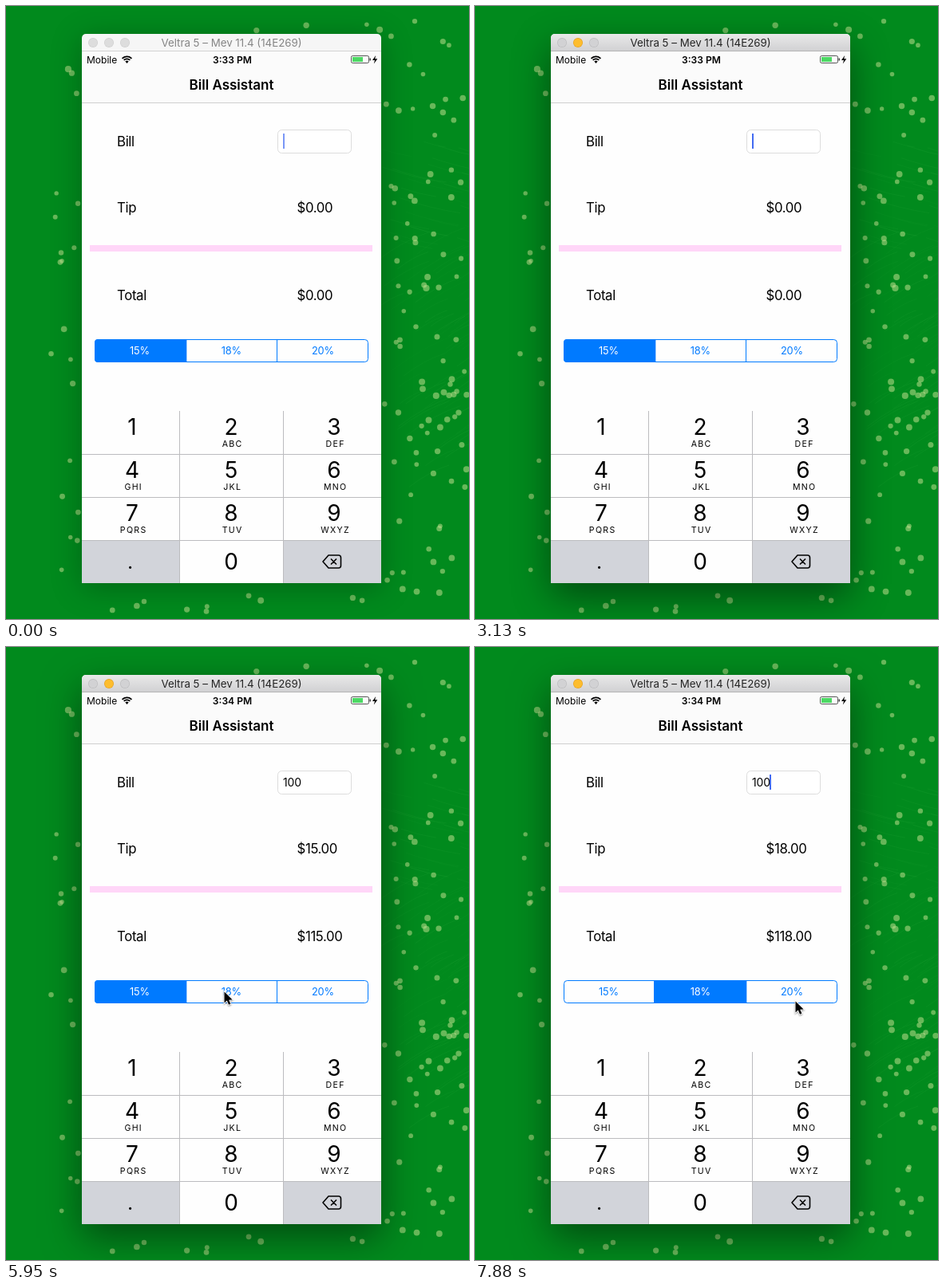
An HTML page with a canvas for the animation above (8000 ms loop, 580 by 769 pixels).

```html
<!DOCTYPE html>
<html lang="en">
<head>
<meta charset="utf-8">
<title>Bill Assistant</title>
<style>
html, body { margin: 0; width: 580px; height: 769px; overflow: hidden; background: #018a1d; }
canvas { display: block; }
</style>
</head>
<body>
<canvas id="stage" width="580" height="769"></canvas>
<script>
const ctx = document.getElementById('stage').getContext('2d');
const LOOP = 8000, TICK = 148.8;
const ACTIVATE = 3100, TYPE_START = 3850, TYPE_END = 4620, SELECT = 6390;
const BLINK = 980;
const BLUE = '#007aff';
const rates = [.15, .18, .2];

const clamp = v => Math.min(1, Math.max(0, v));
const ease = v => v * v * (3 - 2 * v);
const mix = (a, b, v) => a + (b - a) * v;

function seeded(seed) {
  return () => (seed = (seed * 16807) % 2147483647) / 2147483647;
}

function rect(x, y, w, h, color) {
  ctx.fillStyle = color;
  ctx.fillRect(x, y, w, h);
}

function fillPath(points, color) {
  ctx.beginPath();
  points.forEach(([x, y]) => ctx.lineTo(x, y));
  ctx.closePath();
  ctx.fillStyle = color;
  ctx.fill();
}

function rounded(x, y, w, h, r) {
  ctx.beginPath();
  ctx.roundRect(x, y, w, h, r);
}

function circle(x, y, r, color) {
  ctx.beginPath();
  ctx.arc(x, y, r, 0, Math.PI * 2);
  ctx.fillStyle = color;
  ctx.fill();
}

function label(text, x, y, size, { align = 'left', color = '#000', weight = 400, spacing = 0 } = {}) {
  ctx.font = `${weight} ${size}px Inter, sans-serif`;
  ctx.letterSpacing = spacing + 'px';
  ctx.textAlign = align;
  ctx.fillStyle = color;
  ctx.fillText(text, x, y);
}

function wallpaper() {
  rect(0, 0, 580, 769, '#018a1d');
  const rand = seeded(71);
  ctx.lineWidth = .7;
  for (let i = 0; i < 90; i++) {
    const x = 465 + rand() * 110, y = 170 + rand() * 440, len = 25 + rand() * 60;
    const slope = y < 300 ? .25 : -.55;
    ctx.strokeStyle = `rgba(120,220,120,${.03 + rand() * .07})`;
    ctx.beginPath();
    ctx.moveTo(x, y);
    ctx.quadraticCurveTo(x + len / 2, y + len * slope * .7, x + len, y + len * slope);
    ctx.stroke();
  }
  const scatter = (count, x, y, w, h) => {
    for (let i = 0; i < count; i++) {
      circle(x + rand() * w, y + rand() * h, 2.7 + rand() * 1.4, 'rgba(190,222,140,.55)');
    }
  };
  scatter(20, 56, 70, 37, 645);
  scatter(30, 474, 18, 104, 290);
  scatter(62, 474, 308, 104, 450);
  scatter(10, 110, 735, 350, 30);
  scatter(4, 190, 12, 280, 20);
}

function titleBar(active) {
  ctx.save();
  ctx.shadowColor = `rgba(0,0,0,${active ? .45 : .27})`;
  ctx.shadowBlur = active ? 48 : 38;
  ctx.shadowOffsetY = active ? 17 : 6;
  rounded(95, 35, 375, 689, [5, 5, 0, 0]);
  ctx.fillStyle = '#f6f6f6';
  ctx.fill();
  ctx.restore();
  if (active) {
    const shade = ctx.createLinearGradient(0, 35, 0, 56);
    shade.addColorStop(0, '#e9e9e9');
    shade.addColorStop(1, '#d1d1d3');
    rounded(95, 35, 375, 21, [5, 5, 0, 0]);
    ctx.fillStyle = shade;
    ctx.fill();
  }
  rect(95, 56, 375, 1, active ? '#b5b5b5' : '#d3d3d3');
  for (let i = 0; i < 3; i++) {
    const x = 109 + 20 * i, lit = active && i === 1;
    circle(x, 46, 6, lit ? '#e5a223' : active ? '#bdbdbf' : '#cfcfcf');
    circle(x, 46, 5.3, lit ? '#fdbd2e' : active ? '#d2d2d4' : '#dddddd');
  }
  label('Veltra 5 – Mev 11.4 (14E269)', 282.5, 51, 13.3,
    { align: 'center', color: active ? '#252525' : '#858585' });
}

function statusBar(t) {
  rect(95, 57, 375, 64, '#fbfbfb');
  rect(95, 121, 375, 1, '#cfcfcf');
  label('Mobile', 101, 71.5, 12);
  ctx.strokeStyle = '#000';
  ctx.lineWidth = 1.7;
  for (const r of [8.2, 5.2]) {
    ctx.beginPath();
    ctx.arc(151.5, 71.5, r, -Math.PI * .76, -Math.PI * .24);
    ctx.stroke();
  }
  fillPath([[151.5, 72], [149.3, 69.3], [151.5, 68.4], [153.7, 69.3]], '#000');
  label(t < TYPE_START ? '3:33 PM' : '3:34 PM', 283.5, 71.5, 12.1, { align: 'center', weight: 600 });
  ctx.strokeStyle = '#555';
  ctx.lineWidth = 1;
  rounded(432.5, 62.5, 22, 9, 1.8);
  ctx.stroke();
  rect(434, 64, 13, 6, '#4cd964');
  rect(455.5, 65.5, 1.5, 3, '#444');
  fillPath([[463.2, 62], [459, 68], [462, 68], [460.8, 72.5], [465.3, 66.3], [462.2, 66.3]], '#000');
  label('Bill Assistant', 282.5, 105, 17, { align: 'center', weight: 600 });
}

// The blink restarts with a new phase once typing begins.
function caretAlpha(t) {
  if (t >= TYPE_START && t < TYPE_END) return 1;
  const center = t < TYPE_START ? 260 : TYPE_END;
  const distance = Math.abs(t - center - BLINK * Math.round((t - center) / BLINK));
  return clamp((330 - distance) / 100);
}

function typedBill(t) {
  const keyTimes = [TYPE_START, TYPE_START + 300, TYPE_START + 450];
  return '100'.slice(0, keyTimes.filter(k => t >= k).length);
}

function form(t) {
  const bill = typedBill(t), selected = t < SELECT ? 0 : 1;
  const tip = bill * rates[selected];
  const money = n => '$' + n.toFixed(2);
  const style = { spacing: -.35 };
  label('Bill', 139, 176, 16.8, style);
  label('Tip', 139, 259, 16.8, style);
  label('Total', 139, 369, 16.8, style);
  label(money(tip), 364.5, 259, 16.8, style);
  label(money(+bill + tip), 364.5, 369, 16.8, style);
  rect(105, 300, 354, 8, '#ffd6f8');

  rounded(340.5, 155.5, 92, 29, 5);
  ctx.fillStyle = '#fff';
  ctx.fill();
  ctx.strokeStyle = '#dcdcdc';
  ctx.lineWidth = 1;
  ctx.stroke();
  label(bill, 347, 174.7, 14, { spacing: -.1 });
  const caretX = 347 + Math.max(0, Math.round(ctx.measureText(bill).width) - 1);
  ctx.globalAlpha = caretAlpha(t);
  rect(caretX, 160, 2, 19, '#426bf2');
  ctx.globalAlpha = 1;
  segments(selected);
}

function segments(selected) {
  const width = 343 / rates.length;
  ctx.save();
  rounded(111, 418, 343, 29, 4);
  ctx.clip();
  rates.forEach((rate, i) => {
    const x = Math.round(111 + width * i), on = i === selected;
    if (on) rect(x, 418, width + 1, 29, BLUE);
    if (i) rect(x - 1, 418, 1, 29, BLUE);
    label(Math.round(rate * 100) + '%', 167.5 + 114.7 * i, 437, 12.8,
      { align: 'center', color: on ? '#fff' : BLUE, spacing: -.2 });
  });
  ctx.restore();
  rounded(111.5, 418.5, 342, 28, 4);
  ctx.strokeStyle = BLUE;
  ctx.lineWidth = 1;
  ctx.stroke();
}

function keypad() {
  const centers = [158, 282, 411];
  const letters = ['', 'ABC', 'DEF', 'GHI', 'JKL', 'MNO', 'PQRS', 'TUV', 'WXYZ'];
  rect(95, 670, 122, 54, '#d2d4da');
  rect(348, 670, 122, 54, '#d2d4da');
  for (let row = 1; row < 4; row++) rect(95, 508 + 54 * row, 375, 1, '#bcbcbf');
  for (const x of [217, 347]) rect(x, 508, 1, 216, '#bcbcbf');
  letters.forEach((s, i) => {
    const x = centers[i % 3], y = 538 + 54 * Math.floor(i / 3);
    label(i + 1, x, y, 28, { align: 'center' });
    label(s, x + 1.7, y + 15, 10.6, { align: 'center', spacing: 1.3 });
  });
  label('0', 282, 707, 28, { align: 'center' });
  label('.', 155.5, 706, 25, { align: 'center' });
  backspace(410.5, 697);
}

function backspace(x, y) {
  ctx.save();
  ctx.translate(x, y);
  ctx.strokeStyle = '#000';
  ctx.lineWidth = 1.6;
  ctx.lineJoin = 'round';
  ctx.beginPath();
  ctx.moveTo(-13.5, 0);
  ctx.lineTo(-6.5, -8);
  ctx.arcTo(9, -8, 9, 0, 3);
  ctx.arcTo(9, 8, -6.5, 8, 3);
  ctx.lineTo(-6.5, 8);
  ctx.closePath();
  for (const side of [-1, 1]) {
    ctx.moveTo(-3.5 * side, -3.5);
    ctx.lineTo(3.5 * side, 3.5);
  }
  ctx.stroke();
  ctx.restore();
}

function pointer(t) {
  if (t < 4900) return;
  const glide = (start, end) => ease(clamp((t - start) / (end - start)));
  const enter = glide(4900, 5200), reach = glide(5200, 5800), leave = glide(7290, 7870);
  const x = mix(mix(mix(448, 468, enter), 272.5, reach), 421, leave);
  const y = mix(mix(mix(735, 478, enter), 431.5, reach), 446, leave);
  ctx.save();
  ctx.translate(Math.round(x), Math.round(y));
  ctx.shadowColor = 'rgba(0,0,0,.35)';
  ctx.shadowBlur = 2;
  ctx.shadowOffsetY = 1;
  ctx.strokeStyle = '#fff';
  ctx.lineWidth = 1.8;
  fillPath([[.5, .5], [.5, 14.5], [3.8, 11.5], [6, 16.8], [8.4, 15.8], [6.2, 10.7], [10.6, 10.5]], '#000');
  ctx.stroke();
  ctx.shadowColor = 'transparent';
  ctx.fill();
  ctx.restore();
}

function draw(now) {
  // The screen refreshes on a coarse clock, so motion stays stepped.
  const t = Math.floor((now % LOOP + 5) / TICK) * TICK;
  wallpaper();
  titleBar(t >= ACTIVATE);
  rect(95, 122, 375, 602, '#fefefe');
  statusBar(t);
  form(t);
  keypad();
  pointer(t);
  requestAnimationFrame(draw);
}

requestAnimationFrame(draw);
</script>
</body>
</html>
```
